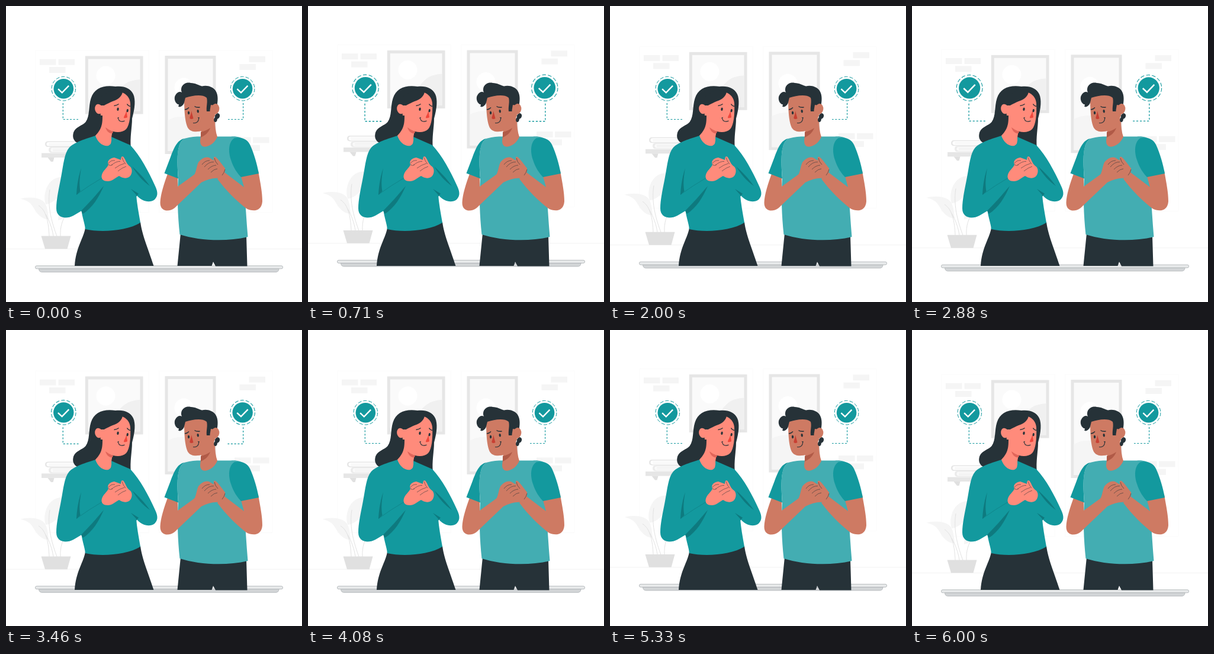
Animation of 500 by 500 pixels, one loop 6.04 s. Source, as an HTML page with a canvas:

```html
<!DOCTYPE html>
<html lang="en">
<head>
<meta charset="utf-8">
<title>Gratitude</title>
<style>
html, body { margin: 0; width: 100%; height: 100%; overflow: hidden; background: #fff; }
canvas { display: block; width: 100vw; height: 100vh; }
</style>
</head>
<body>
<canvas id="stage"></canvas>
<script>
const SIZE = 500, LOOP = 6040, FPS = 24;
const INK = '#263238', TEAL = '#13999e', TEAL_DARK = '#0e7a7f', SHIRT = '#43adb2';
const PINK = '#ff8b7b', BROWN = '#ce7a63';

const canvas = document.getElementById('stage');
const ctx = canvas.getContext('2d');

function fill(d, color) {
  ctx.fillStyle = color;
  ctx.fill(new Path2D(d));
}

function line(d, color, width = 1, dash = []) {
  ctx.strokeStyle = color;
  ctx.lineWidth = width;
  ctx.setLineDash(dash);
  ctx.stroke(new Path2D(d));
  ctx.setLineDash([]);
}

function rect(x, y, w, h, color) {
  ctx.fillStyle = color;
  ctx.fillRect(x, y, w, h);
}

function oval(x, y, rx, ry, color, turn = 0) {
  ctx.fillStyle = color;
  ctx.beginPath();
  ctx.ellipse(x, y, rx, ry, turn, 0, Math.PI * 2);
  ctx.fill();
}

function bar(x, y, w, h, r, color, edge) {
  ctx.beginPath();
  ctx.roundRect(x, y, w, h, r);
  ctx.fillStyle = color;
  ctx.fill();
  ctx.strokeStyle = edge;
  ctx.lineWidth = 0.7;
  ctx.stroke();
}

function brick(x, y) {
  rect(x, y, 27.5, 10, '#f5f5f5');
}

function picture(x, y, w, h, sunX, sunY, hill, hillColor) {
  rect(x, y, w, h, '#e6e6e6');
  rect(x + 5, y + 5, w - 10, h - 10, '#fafafa');
  oval(sunX, sunY, 16, 16, '#fff');
  ctx.save();
  ctx.beginPath();
  ctx.rect(x + 5, y + 5, w - 10, h - 10);
  ctx.clip();
  fill(hill, hillColor);
  ctx.restore();
}

function room() {
  line('M50 75H241.5V348.5H50ZM258.5 75H450V348.5H258.5Z', '#fafafa', 0.8);
  line('M0 410.3H500', '#f0f0f0', 0.8);
  [[57, 89.7], [88.5, 89.7], [73, 103], [410.5, 84.8], [394.5, 98],
   [386, 221.5], [417, 221.5], [401.5, 234.8]].forEach(p => brick(...p));
  picture(133.8, 84.5, 97.7, 98, 168.5, 117.5,
    'M176 180C180 155 192 133 210 127Q220 123.5 232 124V184H176Z', '#f0f0f0');
  picture(268.5, 84, 86, 166, 300.5, 137.5,
    'M270 195Q285 185 304 187C325 190 340 210 352 225V250H270Z', '#f5f5f5');
}

function shelf() {
  rect(60, 248.5, 90, 7.5, '#e6e6e6');
  fill('M70.5 256H81.5L79.5 263H76Z', '#e0e0e0');
  fill('M130 228.5H71Q66 228.5 66 233.2T71 238H130Z', '#e6e6e6');
  fill('M130 230H72Q68.5 230 68.5 233.2T72 236.6H130Z', '#fff');
  line('M72 232.3H130M72 234.6H130', '#ebebeb', 0.7);
  fill('M130 238H77Q72 238 72 243T77 248H130Z', '#ececec');
  fill('M130 239.6H79Q75.5 239.6 75.5 243T79 246.6H130Z', '#fafafa');
  line('M79 242H130M79 244.4H130', '#e8e8e8', 0.7);
}

function plant() {
  fill('M24.5 325.5C38 322 60 322 67 335C71 344 71 353 72 360C61 361 52 351 46 340C41 331 34 328 24.5 325.5Z', '#f5f5f5');
  fill('M67 335C62 320 68 301 80 293Q90 287 101 290C98 310 86 333 67 335Z', '#f5f5f5');
  fill('M88 362C88 345 98 325 115 318C120 340 108 358 88 362Z', '#f5f5f5');
  line('M55 337C68 345 72 365 73 389M74 310C69 340 79 370 86 389M80 389C78 375 73 362 67 352M92 389C91 372 96 360 102 352', '#e2e2e2', 1);
  fill('M59.5 388.5H109.5L103.5 410.3H66Z', '#e0e0e0');
}

function table() {
  bar(55.5, 443.5, 405.5, 6, [0, 0, 5, 5], '#d2d5d7', '#a9aeb1');
  bar(49.4, 438.8, 418.2, 5, 2.5, '#e8eaeb', '#9ea4a7');
}

function badge(x, stem, end, scale) {
  const cx = (end + (end > x ? x - 20.5 : x + 20.5)) / 2, cy = 155.5;
  ctx.save();
  ctx.translate(cx, cy);
  ctx.scale(scale, scale);
  ctx.translate(-cx, -cy);
  oval(x, 139.7, 20.3, 20.3, '#fff');
  oval(x, 139.7, 16.8, 16.8, TEAL);
  line(`M${x + 20.3} 139.7a20.3 20.3 0 1 1 -40.6 0a20.3 20.3 0 1 1 40.6 0`, TEAL, 1, [6, 3.11]);
  line(`M${x - 9.2} 140.2l6.6 6.2l11.4 -11.8`, '#fff', 2.3);
  line(`M${stem} 164V191.5H${end}`, TEAL, 1.2, [3, 2.6]);
  ctx.restore();
}

function woman() {
  // back hair and trousers
  fill('M185 136C164 133 149 139 143.5 156C139 170 142 186 134.5 196C128 203 116 204 113.5 216C111 229 123 236 140 234L165 238L211 240C209 222 213 205 213 190C218 172 219 158 215 149C210 138 198 134.5 185 136Z', INK);
  fill('M134 374C132 391 118 407 116 439H249.5C239 407 230 387 227 365Q180 380 134 374Z', INK);
  // sweater
  fill('M151 219C136 224 115 230 106.500 239.500C98.500 249 97 268 93 289C89 310 85 327 85 342C85 358 101 361 114 354L127.5 346C129 357 133 367 134 377C160 383 205 380 227 366C224 349 221 333 220 319C230 331 243 333 251 327C258 320 256 312 251 302C241 280 227 253 210 235Q196 229 178 221Z', TEAL);
  fill('M127 274C123 286 120 300 119 319L125.5 313C123 299 125 286 127 274Z', TEAL_DARK);
  fill('M165 304C154 317 141 332 127 346L130 351C146 341 157 323 165 304Z', TEAL_DARK);
  fill('M213 271C223 280 233 290 243 304C231 296 221 284 213 271Z', TEAL_DARK);
  fill('M211 309L220 319V322L224 317Z', TEAL_DARK);
  line('M119 318.5Q142 302 163 290', TEAL_DARK, 0.6);
  // neck, face
  fill('M163 180C163 195 164 206 151 219C155 231 165 238 173 236Q179 234 178 222L180 210Z', PINK);
  fill('M168 205C170 212 175 216 180 215L181 212Q174 210 168 205Z', '#e0655a');
  fill('M163 170C168 165 187 161 196 146C204 149 209 155 210 164C211 184 209 201 203 208C196 215 182 214 175 209C165 202 162 190 163 170Z', PINK);
  fill('M162 173C164 165 171 164 180 161C190 158 196 152 197 145L180 141L160 153Z', INK);
  oval(156.5, 174, 6.3, 8.4, PINK, -0.2);
  fill('M158 168H167V185H160Z', PINK);
  fill('M203.5 177C202 183 199 186 199 189Q202 190 205 188Z', '#f0473c');
  oval(189, 174.3, 1.7, 2.8, INK, 0.15);
  oval(205.2, 176.7, 1.6, 2.7, INK, 0.15);
  line('M182.5 168.5Q187 168 190.5 165.5M204.5 165.5Q206 168.5 210 169.5', INK, 1.4);
  line('M189.5 188.5C190 196 196 196 200.5 194', INK, 1.1);
  line('M188 189.5L191 188', INK, 0.8);
  // hands
  fill('M161.5 287C163 278 171 274 173 268C170 261 176 257 183 256L194 260Q194 253 198 254.5C202 259 203 266 208 270C214 273 214 283 209 288C203 293 195 290 191 287C184 291 179 296 172 296Q161 296 161.5 287Z', PINK);
  line('M173 266Q177 260 184 261M178 269Q186 262 193 262.5M184 274Q192 268 200 266M189 279Q196 273 203 271M196 256Q198 263 202 267M173 268Q176 271 180 268', INK, 0.55);
}

function man() {
  fill('M295 384L289.5 439H347.5L350 432L354 439.5H407.5L406 388Z', INK);
  // shirt, neck
  fill('M303 223.5C316 219.5 330 220.5 340 220.5H380C399 219 412 229 412 250L402 308C405 335 406 362 408.5 390C370 399 325 396 293.5 386C290 353 289 322 291 289C289 262 287 229 303 223.5Z', SHIRT);
  fill('M330 209L328 228C328 237 334 239 340 237C349 234 354 228 357 221Q353 210 353 192L345 182Z', BROWN);
  fill('M329 213Q338 211 345 206C342 214 336 219 329 222Z', '#b05a47');
  // arms, then sleeves over them
  fill('M275 278C266 302 261 319 260.5 332C260 347 275 349 285 341L330 298L319 284L290 305V284Z', BROWN);
  fill('M396 284L426 278C430 301 433 315 433 330C432 347 417 348 406 342C390 330 371 311 357 292L369 281L402 306Z', BROWN);
  fill('M303 223.5C291 225 285 236 278 255L267.5 282.5L291 291.5C289 262 287 229 303 223.5Z', TEAL);
  fill('M386 223C376 229 375 245 380 260C384 273 391 283 397 289L427 283C424 267 419 249 412 234C407 224 396 220.5 386 223Z', TEAL);
  fill('M314 291C322 283 321 272 325 264C330 257 338 254 343 256L351 261Q350 253 354 255C360 260 365 268 370 274C371 282 367 287 360 291C350 290 340 293 330 298Z', BROWN);
  line('M331 268Q336 261 344 261M335 272Q342 263 351 263.5M341 276Q348 269 355 269M346 281Q352 275 357 275M352 257Q353 263 358 268M370 276Q369 281 365 286', INK, 0.55);
  // head
  oval(357, 186, 4, 5, INK, 0.4);
  oval(354, 192, 2.8, 4, INK, 0.2);
  fill('M301 154C301 174 302 198 308 207C313 214 325 213 333 210C344 206 350 198 353 182L352 153L330 147Z', BROWN);
  fill('M301 163C300 168 293 173 291 169C293 167 292 166 290 166C284 162 284 154 286 151C289 145 294 144 297 146C293 136 302 127.500 312 130C320 130 325 134 331 135.500C342 133 353 138 356 147C359 155 357 165 356 172L347 178L339 178C338 170 341 162 339 155C330 148 314 152 303 155Z', INK);
  oval(353.5, 174, 6.8, 9, BROWN, 0.15);
  fill('M346 167L353 168V186L344.5 188V176Z', BROWN);
  fill('M313 177C313 183 310 187 310.5 190Q313 192 316.5 190Z', '#c83f33');
  oval(308.6, 180.5, 1.7, 2.7, INK, -0.1);
  oval(324.2, 177.7, 1.7, 2.7, INK, -0.1);
  line('M302 175Q306.5 174.500 309 171.500M318.5 169.5Q322 172 327.5 171', INK, 1.4);
  line('M316 197.5C322 198.5 326 195 325.5 188.5M324 188.5L327 189', INK, 1.1);
}

// two beats, then rest
function heartbeat(p) {
  const ramp = (a, b) => (p - a) / (b - a);
  let k = 0;
  if (p < 0.1) k = ramp(0, 0.1);
  else if (p < 0.3) k = 1 - ramp(0.1, 0.3);
  else if (p >= 0.4 && p < 0.5) k = ramp(0.4, 0.5);
  else if (p >= 0.5 && p < 0.6) k = 1 - ramp(0.5, 0.6);
  return 1 + 0.1 * k;
}

function draw(ms) {
  const t = Math.floor((ms % LOOP + 2) * FPS / 1000) / FPS;
  const lift = 10 * (1 - Math.abs(1 - (t % 1.5) / 0.75));
  const beat = heartbeat((t % 6) / 6);
  const ratio = window.devicePixelRatio || 1;
  const w = Math.round(innerWidth * ratio), h = Math.round(innerHeight * ratio);
  if (canvas.width !== w || canvas.height !== h) {
    canvas.width = w;
    canvas.height = h;
  }
  ctx.setTransform(w / SIZE, 0, 0, h / SIZE, 0, 0);
  rect(0, 0, SIZE, SIZE, '#fff');
  ctx.save();
  ctx.translate(0, -lift);
  room();
  shelf();
  plant();
  table();
  ctx.restore();
  badge(97.3, 96.3, 122, beat);
  badge(399.6, 400.6, 375, beat);
  woman();
  man();
}

const start = performance.now();
function tick() {
  draw(performance.now() - start);
  requestAnimationFrame(tick);
}
tick();
</script>
</body>
</html>
```
